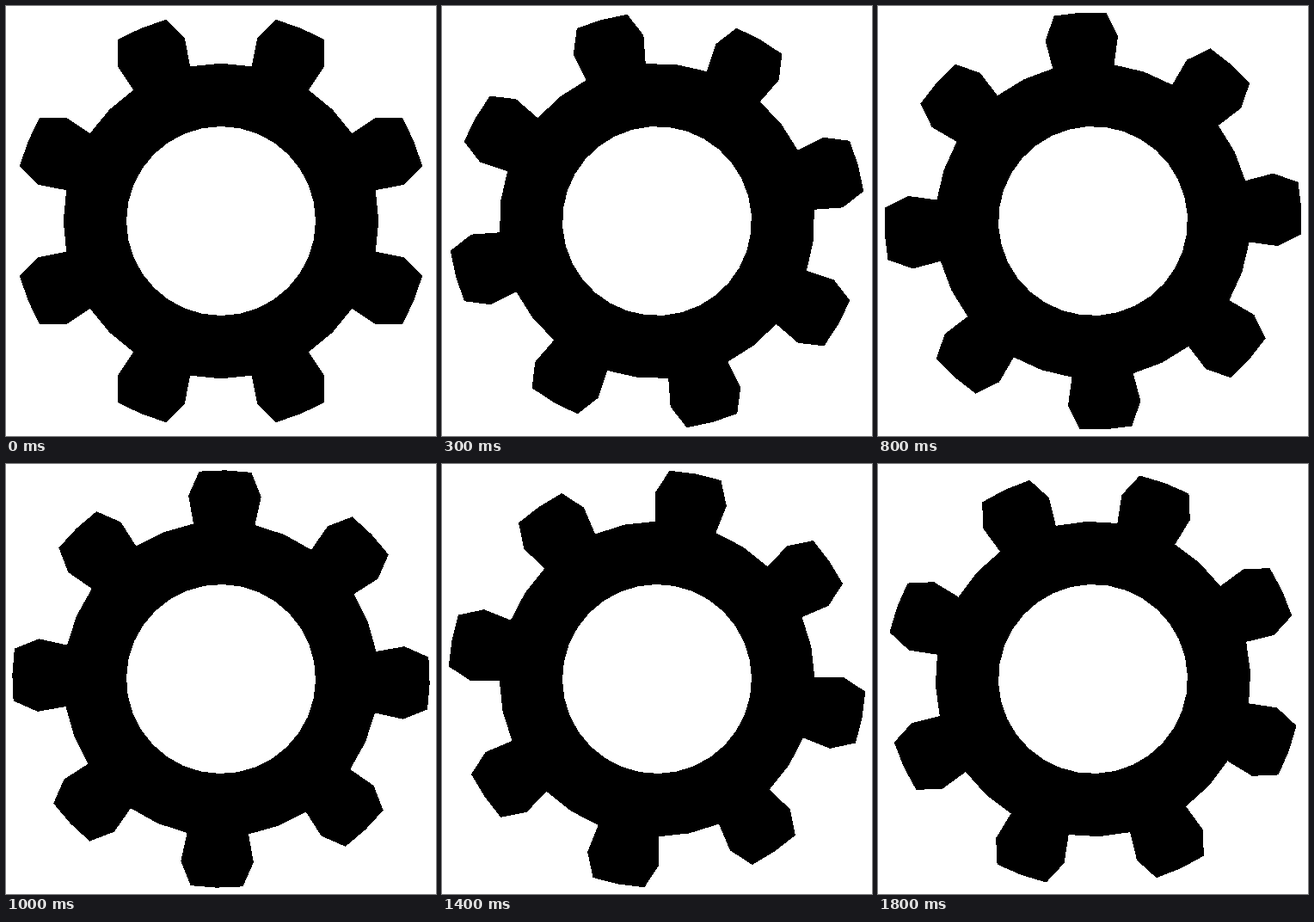
Recreate the animation shown at these times as an HTML page. Size 500x500 px, loop 1.9 s.

```html
<!DOCTYPE html>
<html lang="en">
<head>
<meta charset="utf-8">
<title>Turning gear</title>
<style>
  html, body { margin: 0; width: 100%; height: 100%; overflow: hidden; background: #fff; }
  svg { display: block; width: 100vw; height: 100vh; }
</style>
</head>
<body>
<svg viewBox="0 0 500 500" shape-rendering="crispEdges">
  <path id="gear" fill="#000" fill-rule="evenodd"/>
</svg>
<script>
const LOOP = 1900, STEPS = 19, TEETH = 8;
const PITCH = 360 / TEETH, QUARTER = PITCH / 4;
const HOLE = 110, BODY = 183.3, SHOULDER = 216.7, TIP = 242.7, TIP_HALF = 7.2;
const gear = document.getElementById('gear');

// Point at radius r, angle in degrees clockwise from the top
function point(r, deg) {
  const a = deg * Math.PI / 180;
  return (250 + r * Math.sin(a)).toFixed(3) + ' ' + (250 - r * Math.cos(a)).toFixed(3);
}

const polygon = points => 'M' + points.join('L') + 'Z';

function gearPath(turn) {
  const rim = [], hole = [];
  for (let i = 0; i < TEETH; i++) {
    const start = turn + i * PITCH;
    const mid = start + PITCH / 2;
    rim.push(
      point(BODY, start),
      point(BODY, mid - QUARTER),
      point(SHOULDER, mid - QUARTER),
      point(TIP, mid - TIP_HALF),
      point(TIP, mid),
      point(TIP, mid + TIP_HALF),
      point(SHOULDER, mid + QUARTER),
      point(BODY, mid + QUARTER)
    );
    for (let k = 0; k < 4; k++) hole.push(point(HOLE, start + k * QUARTER));
  }
  return polygon(rim) + polygon(hole);
}

function draw(ms) {
  const step = Math.floor((ms % LOOP) / LOOP * STEPS + 1e-6) % STEPS;
  gear.setAttribute('d', gearPath(step * PITCH / STEPS));
}

let begin = null;
function tick(now) {
  if (begin === null) begin = now;
  draw(Math.max(0, now - begin));
  requestAnimationFrame(tick);
}

draw(0);
requestAnimationFrame(tick);
</script>
</body>
</html>
```
